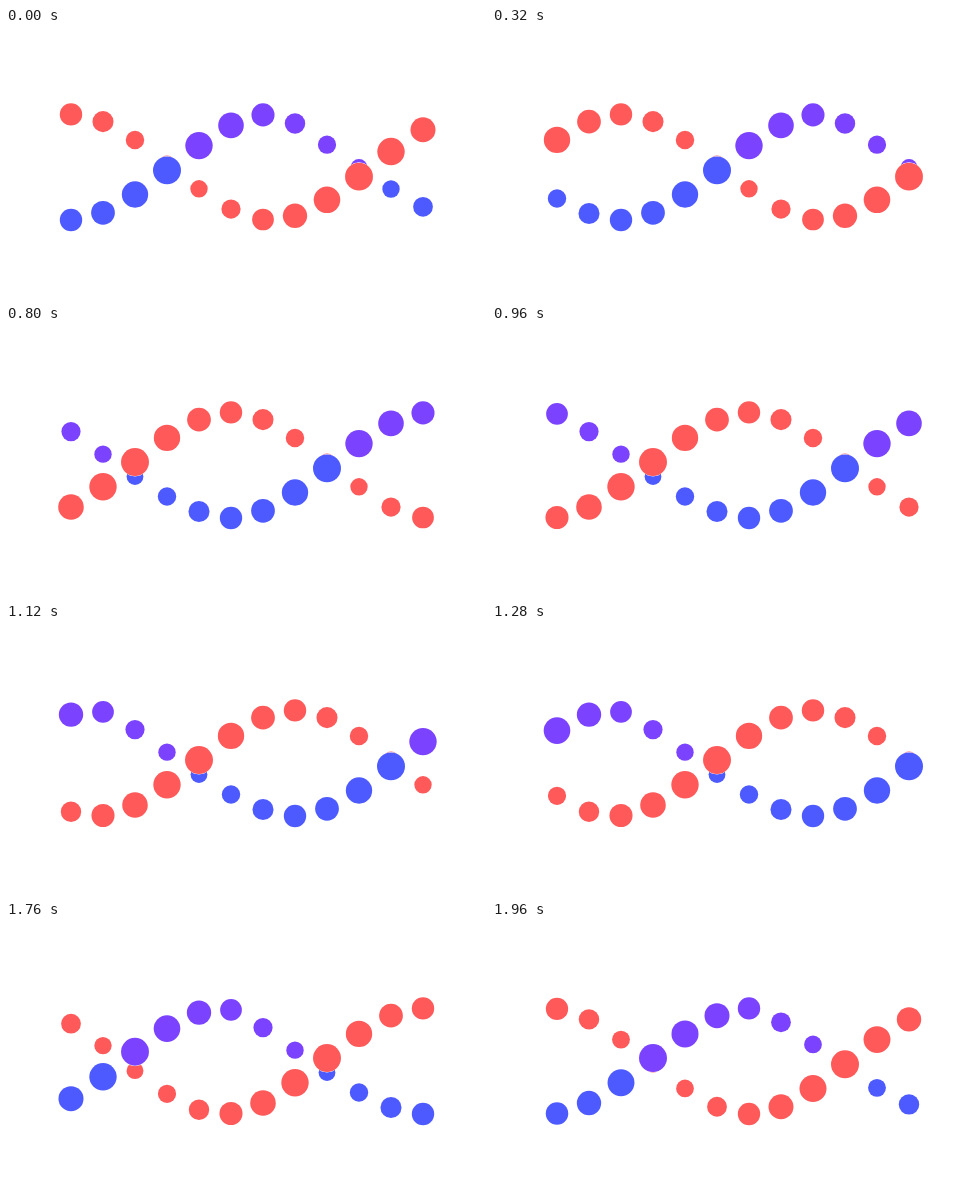
These frames come from a looping animation (480x270 px, 2 s). An HTML page with a canvas:

```html
<!DOCTYPE html>
<html lang="en">
<head>
<meta charset="utf-8">
<title>Helix loader</title>
<style>
  html, body { margin: 0; width: 100%; height: 100%; overflow: hidden; background: #fff; }
  canvas { display: block; }
</style>
</head>
<body>
<canvas id="stage" width="480" height="270"></canvas>
<script>
const ctx = document.getElementById('stage').getContext('2d');
const LOOP = 2000, STEP = 40, DELAY = 160, COLUMNS = 12;
const RED = '#ff595a', BLUE = '#4d5aff', PURPLE = '#7b42ff';
const TOP = 86.4, BOTTOM = 192, RADIUS = 11.2;

const smooth = p => p * p * (3 - 2 * p);

// cubic-bezier(1/3, 0, 5/6, 1)
function lateEase(p) {
  let s = p;
  for (let i = 0; i < 5; i++)
    s -= (s + s * s / 2 - s ** 3 / 2 - p) / (1 + s - 1.5 * s * s);
  return smooth(s);
}

// Depth runs 0 -> 1 -> -1 -> 0 over one turn.
function depth(t) {
  if (t < 500) return smooth(t / 500);
  if (t < 1500) return 1 - 2 * smooth((t - 500) / 1000);
  return smooth((t - 1500) / 500) - 1;
}

function dot(x, travel, scale, color) {
  ctx.beginPath();
  ctx.arc(x, TOP + (BOTTOM - TOP) * travel, RADIUS * scale, 0, Math.PI * 2);
  ctx.strokeStyle = '#fff';
  ctx.stroke();
  ctx.fillStyle = color;
  ctx.fill();
}

function draw(time) {
  ctx.fillStyle = '#fff';
  ctx.fillRect(0, 0, 480, 270);
  for (let i = 0; i < COLUMNS; i++) {
    const t = (time - i * DELAY + LOOP) % LOOP;
    const x = 65 + 32 * i;
    const first = t < 1000;
    const p = (t % 1000) / 1000;
    const grow = depth(t) / 4;
    const red = () => dot(x, first ? smooth(p) : 1 - smooth(p), 1 + grow, RED);
    const blue = () => dot(x, first ? 1 - lateEase(p) : smooth(p), 1 - grow,
      t >= 500 && t < 1500 ? PURPLE : BLUE);
    // The larger dot is in front.
    (first ? [blue, red] : [red, blue]).forEach(paint => paint());
  }
}

function tick() {
  draw(Math.floor(performance.now() % LOOP / STEP) * STEP);
  requestAnimationFrame(tick);
}
tick();
</script>
</body>
</html>
```
